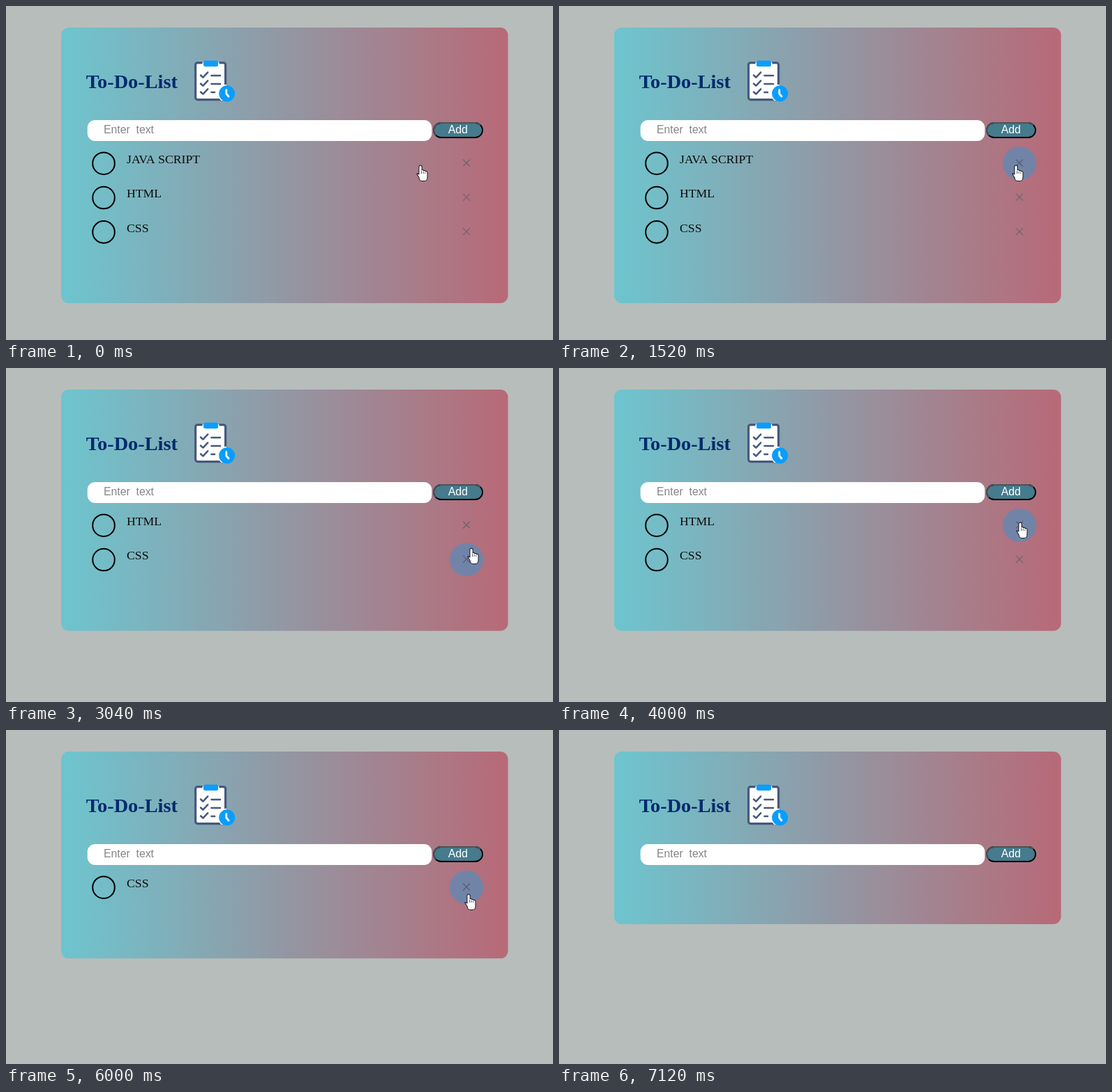
Write an HTML page with a canvas that moves like this. It is 784 by 480 pixels and loops after 7.68 s.

```html
<!DOCTYPE html>
<html lang="en">
<head>
<meta charset="utf-8">
<title>To-Do-List</title>
<style>
  html, body { margin: 0; width: 100%; height: 100%; overflow: hidden; background: #b7bdbb; }
  canvas { display: block; width: 784px; height: 480px; }
</style>
</head>
<body>
<canvas id="stage" width="784" height="480"></canvas>
<script>
const ctx = document.getElementById('stage').getContext('2d');
const LOOP = 7680, STEP = 80, PITCH = 49.35, CROSS_X = 660, HOVER_R = 24;
const SERIF = '"Liberation Serif", "Times New Roman", serif';
const SANS = '"Liberation Sans", Arial, sans-serif';
const NAVY = '#46587f', BLUE = '#0a9dfc', INK = '#15151c';

const tasks = ['JAVA SCRIPT', 'HTML', 'CSS'];
const removals = [1920, 4800, 6080];

// Fingertip stops; each hop ends at `at` and takes `span` ms.
const stops = [
  { at: 0, x: 594, y: 229 },
  { at: 640, x: 654, y: 222, span: 640 },
  { at: 1360, x: 655, y: 229 },
  { at: 2640, x: 667, y: 252, span: 400 },
  { at: 3040, x: 667, y: 259 },
  { at: 3360, x: 667, y: 252, span: 160 },
  { at: 4000, x: 661, y: 222 },
  { at: 6000, x: 663, y: 236 }
];

const ease = u => u * u * (3 - 2 * u);
const rowY = row => 226.2 + row * PITCH;

function pointerAt(t) {
  let { x, y } = stops[0];
  for (const s of stops.slice(1)) {
    const span = s.span || STEP;
    const k = ease(Math.min(1, Math.max(0, (t - s.at + span) / span)));
    x += (s.x - x) * k;
    y += (s.y - y) * k;
  }
  return { x, y };
}

function box(x, y, w, h, r, fill) {
  ctx.beginPath();
  ctx.roundRect(x, y, w, h, r);
  ctx.fillStyle = fill;
  ctx.fill();
}

function disc(x, y, r, fill) {
  ctx.beginPath();
  ctx.arc(x, y, r, 0, Math.PI * 2);
  ctx.fillStyle = fill;
  ctx.fill();
}

function line(color, width, ...pts) {
  ctx.beginPath();
  pts.forEach(([x, y]) => ctx.lineTo(x, y));
  ctx.strokeStyle = color;
  ctx.lineWidth = width;
  ctx.stroke();
}

function label(str, x, y, font, color) {
  ctx.font = font;
  ctx.fillStyle = color;
  ctx.fillText(str, x, y);
}

function drawCard(count) {
  const g = ctx.createLinearGradient(79, 0, 720, 0);
  g.addColorStop(0, '#6dc5cf');
  g.addColorStop(1, '#b86977');
  box(79, 31, 640.5, 248 + count * PITCH, 11, g);
}

function drawIcon() {
  ctx.save();
  ctx.lineCap = ctx.lineJoin = 'round';
  box(271.6, 81.6, 43, 53, 3, '#fff');
  ctx.strokeStyle = NAVY;
  ctx.lineWidth = 3.2;
  ctx.stroke();
  box(281.5, 80, 24, 8.5, 2, '#fff');
  box(283, 78.5, 21, 8.5, 2.5, BLUE);
  for (let i = 0; i < 3; i++) {
    const y = 99.5 + 12 * i;
    line(NAVY, 2.5, [279, y], [282.4, y + 3.2], [289.2, y - 4.2]);
    line(NAVY, 2.6, [294.5, y + 0.5], [i < 2 ? 307 : 299, y + 0.5]);
  }
  ctx.save();
  ctx.beginPath();
  ctx.rect(270, 80, 46, 56);
  ctx.clip();
  disc(316.7, 125.8, 13, '#fff');
  ctx.restore();
  disc(316.7, 125.8, 11.5, BLUE);
  line('#fff', 2.8, [315.8, 120.7], [315.8, 126.2], [319, 130]);
  ctx.restore();
}

function drawButton() {
  const outline = color => {
    ctx.beginPath();
    ctx.roundRect(613, 168, 70, 21, 10.5);
    ctx.strokeStyle = color;
    ctx.lineWidth = 1.8;
    ctx.stroke();
  };
  box(612.2, 167, 71.6, 23, 11.5, '#457b8c');
  outline('#000');
  ctx.save();
  ctx.beginPath();
  [[611, 166], [685, 166], [673, 178.5], [623, 178.5], [611, 191]].forEach(p => ctx.lineTo(...p));
  ctx.clip();
  outline('#4c5356');
  ctx.restore();
  label('Add', 633.8, 183.2, '15.8px ' + SANS, '#fff');
}

function drawRow(name, row, tip) {
  const y = rowY(row), m = y - 0.7;
  const hot = tip && Math.hypot(tip.x - CROSS_X, tip.y - y) < HOVER_R;
  ctx.beginPath();
  ctx.arc(140, y, 15.8, 0, Math.PI * 2);
  ctx.strokeStyle = '#000';
  ctx.lineWidth = 2;
  ctx.stroke();
  label(name, 173, y - 0.2, '17.7px ' + SERIF, '#0a0a0a');
  if (hot) disc(CROSS_X, y - 0.2, HOVER_R, '#7184a8');
  for (const d of [-5, 5]) {
    line(hot ? '#585d74' : '#71626a', 1.2, [CROSS_X - 5, m - d], [CROSS_X + 5, m + d]);
  }
}

// Hand with its fingertip at the origin.
const hand = new Path2D('M-4.6 12.2 L-1 14 L0 20 Z');
hand.roundRect(-1.6, 0.6, 3.2, 16, 1.6);
for (let i = 0; i < 3; i++) hand.roundRect(1.5 + 2.6 * i, 7 + i, 2.8, 9, 1.4);
hand.roundRect(-1.4, 12, 10.8, 10, [0, 0, 4, 4]);

function drawHand({ x, y }) {
  ctx.save();
  ctx.translate(x, y);
  ctx.lineJoin = 'round';
  ctx.strokeStyle = INK;
  ctx.lineWidth = 2;
  ctx.stroke(hand);
  ctx.fillStyle = '#fff';
  ctx.fill(hand);
  for (let i = 0; i < 3; i++) {
    const k = 1.6 + 2.6 * i;
    line(INK, 0.7, [k, 8 + i], [k, 12]);
  }
  ctx.restore();
}

function draw(now) {
  const t = Math.floor((now % LOOP) / STEP) * STEP;
  const left = tasks.slice(removals.filter(r => t >= r).length);
  const tip = left.length ? pointerAt(t) : null;

  ctx.fillStyle = '#b7bdbb';
  ctx.fillRect(0, 0, 784, 480);
  drawCard(left.length);
  label('To-Do-List', 114.8, 118, 'bold 28.3px ' + SERIF, '#002a6c');
  drawIcon();
  box(116.7, 164, 493.6, 30, 11, '#fff');
  label('Enter  text', 140, 183.2, '15.8px ' + SANS, '#858585');
  drawButton();
  left.forEach((name, i) => drawRow(name, i, tip));
  if (tip) drawHand(tip);
}

const start = performance.now();
function tick() {
  draw(performance.now() - start);
  requestAnimationFrame(tick);
}
tick();
</script>
</body>
</html>
```
